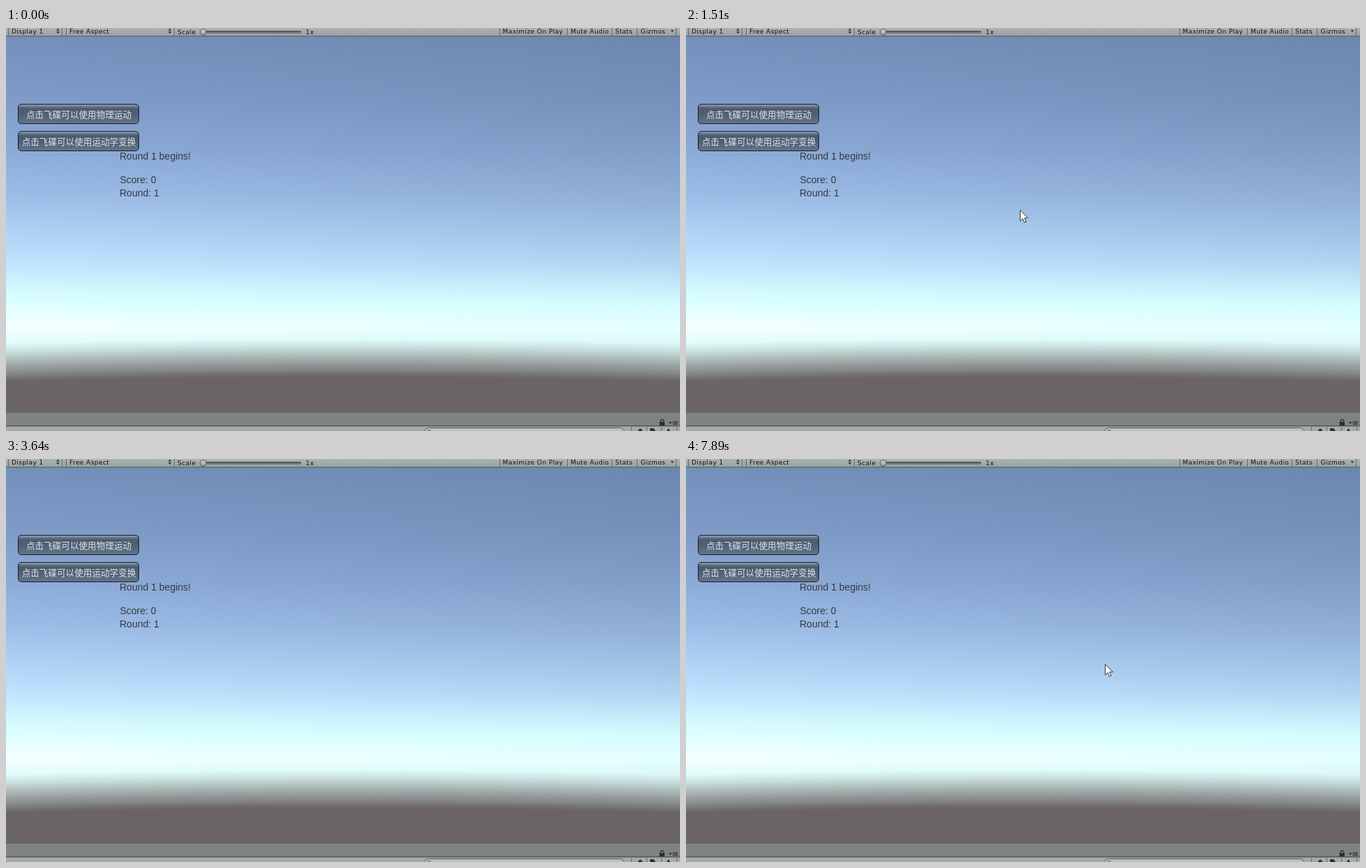
Recreate the animation shown at these times as an HTML page. Size 967x579 px, loop 8000 ms.

```html
<!DOCTYPE html>
<html lang="en">
<head>
<meta charset="utf-8">
<title>Game view</title>
<style>
html, body { margin: 0; width: 100%; height: 100%; overflow: hidden; background: #808382; }
.stage { position: relative; width: 967px; height: 579px; overflow: hidden; }
.stage > * { position: absolute; }

.sky { left: 0; top: 0; width: 967px; height: 551px; }
.near {
  background: linear-gradient(#7590bb 13px, #7f9bc8 100px, #8eacd9 180px, #9bbbe6 235px,
    #a9cbf1 275px, #b5d9f9 310px, #c2e9ff 345px, #d2faff 375px, #e0ffff 400px, #f5ffff 431px, #e2fdfc 449px);
}
.far {
  background: linear-gradient(#6c88b0 13px, #7490ba 100px, #819ec8 180px, #92b0d8 250px,
    #a3c4e6 300px, #b2d6f2 340px, #c3ebfb 370px, #d5feff 400px, #e4ffff 433px, #dcf9f8 449px);
  -webkit-mask-image: linear-gradient(90deg, transparent, #000);
  mask-image: linear-gradient(90deg, transparent, #000);
}
.ground {
  background: radial-gradient(ellipse 2447px 290px at 483px 737px,
    #6a6564 81%, rgba(106,101,100,.95) 82.4%, rgba(106,101,100,.77) 85.2%, rgba(106,101,100,.6) 88.6%,
    rgba(106,101,100,.41) 92.1%, rgba(106,101,100,.21) 95.5%, rgba(106,101,100,0) 100%);
}

.chrome { left: 0; top: 0; }
.bar { font: 9px "DejaVu Sans", sans-serif; letter-spacing: .43px; fill: #111; }
.hud { font: 14px "Liberation Sans", Arial, sans-serif; fill: #343a43; }
.btn { font: 12.6px "Noto Sans CJK SC", "Noto Sans CJK", sans-serif; fill: #dfe4e6; text-anchor: middle; }

.cursor {
  width: 12px; height: 19px;
  animation: move 8s -4ms infinite, show 8s -4ms step-end infinite;
}
@keyframes show {
  0% { visibility: hidden; }
  1% { visibility: visible; }
  45.5% { visibility: hidden; }
  54.5%, 100% { visibility: visible; }
}
/* Each stretch advances in as many jumps as the pointer was sampled. */
@keyframes move {
  0% { left: 881px; top: 566px; animation-timing-function: step-end; }
  1% { left: 881px; top: 566px; animation-timing-function: steps(12); }
  7.875% { left: 586px; top: 382px; animation-timing-function: steps(3); }
  9.6% { left: 436px; top: 170px; animation-timing-function: steps(2); }
  10.75% { left: 383px; top: 212px; animation-timing-function: steps(1); }
  11.375% { left: 368px; top: 240px; animation-timing-function: steps(7); }
  15.375% { left: 589px; top: 370px; animation-timing-function: steps(6); }
  18.875% { left: 479px; top: 261px; animation-timing-function: steps(4); }
  21.125% { left: 390px; top: 209px; animation-timing-function: steps(12); }
  29% { left: 225px; top: 102px; animation-timing-function: steps(1); }
  30% { left: 223px; top: 103px; animation-timing-function: steps(3); }
  31.625% { left: 323px; top: 167px; animation-timing-function: steps(16); }
  41.75% { left: 535px; top: 275px; animation-timing-function: step-end; }
  54.5% { left: 842px; top: 548px; animation-timing-function: steps(6); }
  58.75% { left: 596px; top: 340px; animation-timing-function: steps(2); }
  60.25% { left: 618px; top: 325px; animation-timing-function: step-end; }
  91.0875% { left: 618px; top: 325px; animation-timing-function: steps(4); }
  93.25% { left: 612px; top: 310px; animation-timing-function: step-end; }
  96.75% { left: 612px; top: 310px; animation-timing-function: steps(3); }
  98.625%, 100% { left: 601px; top: 294px; }
}
</style>
</head>
<body>
<div class="stage">
  <div class="sky near"></div>
  <div class="sky far"></div>
  <div class="sky ground"></div>

  <svg class="chrome" width="967" height="579" viewBox="0 0 967 579">
    <defs>
      <linearGradient id="strip" x2="0" y2="1">
        <stop stop-color="#acb4b3"/><stop offset="1" stop-color="#98a19f"/>
      </linearGradient>
      <linearGradient id="face" x2="0" y2="1">
        <stop stop-color="#8190a3"/><stop offset=".12" stop-color="#6c7c92"/>
        <stop offset=".22" stop-color="#4c5b70"/><stop offset=".55" stop-color="#506176"/>
        <stop offset="1" stop-color="#64748a"/>
      </linearGradient>
      <linearGradient id="knob" x2="0" y2="1">
        <stop stop-color="#d5dad9"/><stop offset="1" stop-color="#8f9796"/>
      </linearGradient>
      <path id="updown" d="M0 3.5 2.5 .5 5 3.5ZM0 5 2.5 8 5 5Z" fill="#333a39"/>
      <g id="button">
        <rect x=".5" y=".5" width="173" height="28" rx="4.5" fill="url(#face)" stroke="#18202b"/>
        <path d="M5 1.8H169" stroke="#9aa6b5" stroke-opacity=".7"/>
      </g>
    </defs>

    <!-- top toolbar -->
    <rect width="967" height="12" fill="url(#strip)"/>
    <rect y="11" width="967" height="1.5" fill="#646f74"/>
    <path d="M3.5 0V11M80.5 0V11M86.5 0V11M241.5 0V11M708.5 0V11M805.5 0V11M869.5 0V11M905.5 0V11M961.5 0V11" stroke="#626a69"/>
    <use href="#updown" x="72" y="0"/>
    <use href="#updown" x="232.500" y="0"/>
    <rect x="283" y="4" width="141" height="4" rx="2" fill="#737b7a"/>
    <path d="M285 4.7H423" stroke="#444b4a" stroke-width="1.4"/>
    <circle cx="283" cy="6" r="4.400" fill="url(#knob)" stroke="#4c5352"/>
    <path d="M953.500 3H958.500L956 6Z" fill="#333a39"/>
    <g class="bar">
      <text x="8" y="8">Display 1</text>
      <text x="91" y="8">Free Aspect</text>
      <text x="246" y="9">Scale</text>
      <text x="430" y="9">1x</text>
      <text x="712.500" y="8">Maximize On Play</text>
      <text x="810" y="8">Mute Audio</text>
      <text x="874" y="8">Stats</text>
      <text x="910.500" y="8">Gizmos</text>
    </g>

    <!-- buttons and status -->
    <use href="#button" x="17" y="109"/>
    <use href="#button" x="17" y="148"/>
    <g class="btn">
      <text x="104.500" y="129">点击飞碟可以使用物理运动</text>
      <text x="104.500" y="167.500">点击飞碟可以使用运动学变换</text>
    </g>
    <g class="hud">
      <text x="163" y="189">Round 1 begins!</text>
      <text x="163.500" y="223">Score: 0</text>
      <text x="163" y="242">Round: 1</text>
    </g>

    <!-- bottom panel -->
    <rect y="551" width="967" height="28" fill="#808382"/>
    <rect y="551" width="967" height="1.500" fill="#5f6262"/>
    <rect y="571" width="967" height="1.500" fill="#4d5251"/>
    <rect y="572.500" width="967" height="6.500" fill="#a4acaa"/>
    <rect x="599.500" y="574.500" width="288" height="14" rx="7" fill="#b9c0be" stroke="#515857"/>
    <circle cx="607" cy="580" r="2.500" fill="none" stroke="#515857"/>
    <path d="M897.500 573V579M919.500 573V579M940.500 573V579M962.500 573V579" stroke="#666e6d"/>
    <g fill="#2b3030">
      <path d="M906 579 910 575 914 579ZM924 575H929L932 579H924ZM948 579 950.500 575 953 579Z"/>
      <rect x="937.500" y="566" width="7.500" height="5"/>
      <path d="M951 566H955.500L953.200 569Z"/>
    </g>
    <path d="M939 566V564.500Q941.300 560.500 943.500 564.500V566" fill="none" stroke="#2b3030" stroke-width="1.300"/>
    <path d="M956.500 565.500H964M956.500 567.500H964M956.500 569.500H964" stroke="#2b3030"/>
  </svg>

  <svg class="cursor" viewBox="0 0 12 19">
    <path d="M.5.8V16.300L4.100 12.900 6.600 18.400 9 17.400 6.600 12H11.400Z" fill="#fff" stroke="#222" stroke-width=".9"/>
  </svg>
</div>
</body>
</html>
```
